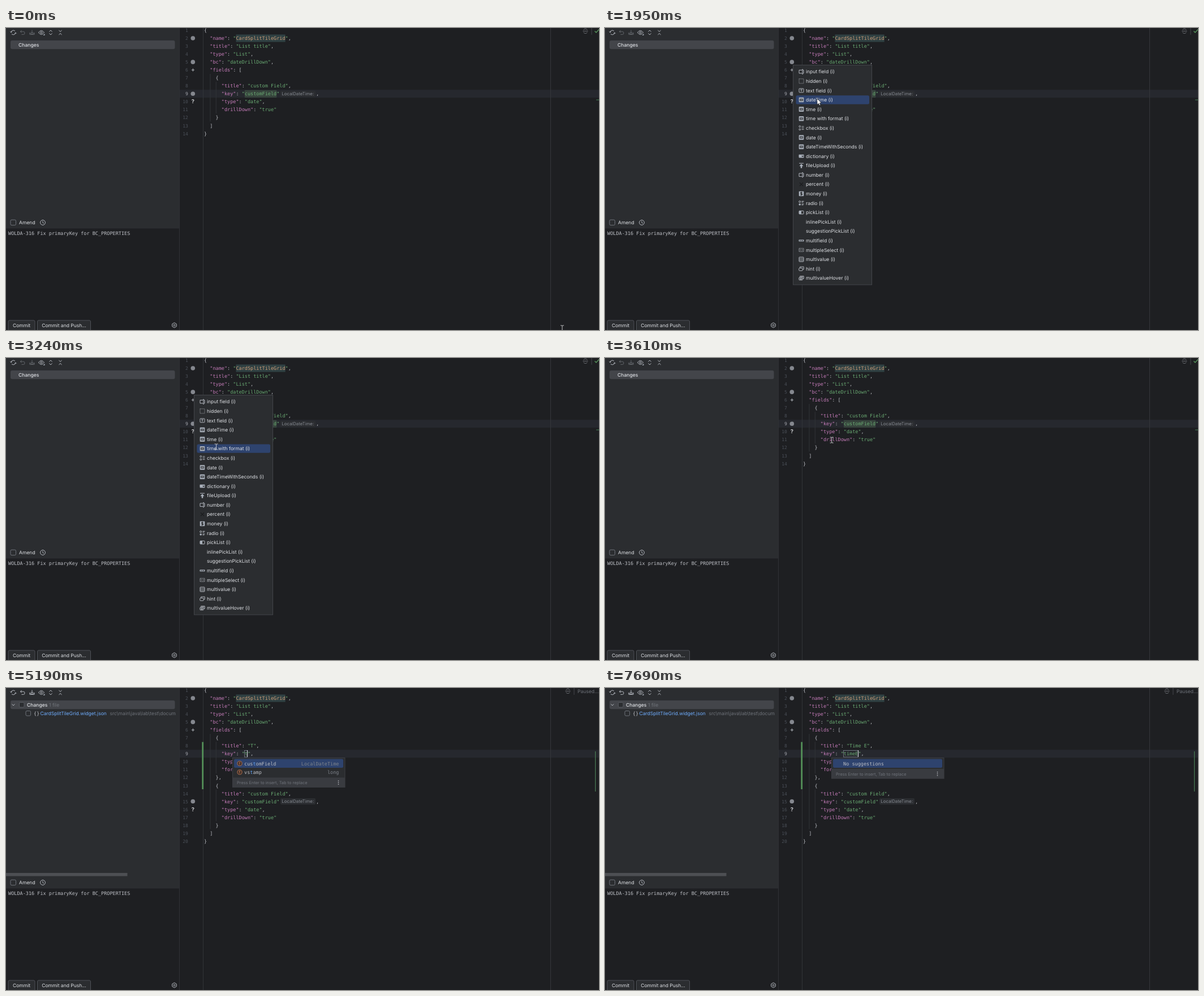
These frames come from a looping animation (1048 px wide and 534 px high, 8 s). An HTML page:

```html
<!DOCTYPE html>
<html lang="en">
<head>
<meta charset="utf-8">
<title>Editor</title>
<style>
html, body { margin: 0; width: 100%; height: 100%; overflow: hidden; background: #1e1f22; }
svg { display: block; width: 1048px; height: 534px; }
text { font: 8.55px Inter, sans-serif; fill: #dfe1e5; white-space: pre; text-rendering: geometricPrecision; }
.mono { font: 8.52px "DejaVu Sans Mono", monospace; fill: #bcbec4; }
.num { font-size: 8px; fill: #4b5059; text-anchor: end; }
.current { fill: #a1a3ab; }
.end { text-anchor: end; }
.mid { text-anchor: middle; }
.strong { font-weight: 500; }
.key { fill: #c77dbb; }
.str { fill: #6aab73; }
.ref { fill: #cf9d78; }
.hit { fill: #62a3f2; }
.link { fill: #70aeff; }
.grey { fill: #6f737a; }
.type { fill: #7f848c; }
.small { font-size: 7.4px; }
.hint { font-size: 7.8px; fill: #868a91; }
.help { font-size: 9.5px; font-weight: 600; }
.badge { font-size: 6.5px; fill: #e08855; }
.line { fill: none; stroke: #b4b8bf; stroke-width: 1; }
.off { opacity: .38; }
.solid { fill: #a9b0ba; }
.mouse { fill: #fff; stroke: #111; stroke-width: .6; }
</style>
</head>
<body>
<svg viewBox="0 0 1048 534">
  <g id="side"></g>
  <g id="editor"></g>
  <g id="folds"></g>
  <g id="typing"></g>
  <g id="menu"></g>
  <g id="cursor"></g>
</svg>
<script>
const LOOP = 8000, CHAR = 5.13, CODE_X = 350, ROW = 16.59, MENU_Y = 77.3;
const INSERTED = 3640, SUGGESTED = 3860, LISTED = 4130;
const NAME = 'CardSplitTileGrid';
const $ = id => document.getElementById(id);

const lineY = n => 4 + 14.035 * (n - 1);
const col = n => CODE_X + n * CHAR;
const text = (x, y, s, cls = '') => `<text x="${x}" y="${y + 3.1}" class="${cls}">${s}</text>`;
const rect = (x, y, w, h, fill, more = '') =>
  `<rect x="${x}" y="${y}" width="${w}" height="${h}" fill="${fill}" ${more}/>`;
const path = (d, more = 'class="line"') => `<path d="${d}" ${more}/>`;
const at = (x, y, body, more = '') => `<g transform="translate(${x} ${y})" ${more}>${body}</g>`;
const outline = color => `stroke="${color}" rx="2"`;

// Left panel

function toolbar(active) {
  const dim = active ? '' : 'class="off"';
  const chevrons = (a, b) => path(`M-2.6 ${a}L0 ${b}L2.6 ${a}M-2.6 ${-a}L0 ${-b}L2.6 ${-a}`);
  return at(13, 8, path('M-4-.5A4 4 0 0 1 3-2.5M4 .5A4 4 0 0 1-3 2.5M-5.5-1.8L-4 0L-2.3-1.6M5.5 1.8L4 0L2.3 1.6'))
    + at(29.5, 8, path('M-1.8-4L-4-1.7L-1.8 .5M-4-1.7H1A2.6 2.6 0 0 1 1 3.5H-2'), dim)
    + at(46, 8, path('M0-4.5V1M-2.2-1L0 1.2L2.2-1M-4 0V3.5H4V0M-4 1.5H-2L-1 2.8H1L2 1.5H4'), dim)
    + at(62.5, 8, path('M-5 0Q0-7 5 0Q0 7-5 0Z') + '<circle r="1.6" class="line"/>'
      + path('M6 2V5H3Z', 'class="solid"'))
    + at(79, 8, chevrons(-1.5, -4))
    + at(96, 8, chevrons(-4, -1.5));
}

function tree(listed) {
  const row = rect(8, 22, 290.5, 15.3, '#43454a', 'rx="3"');
  if (!listed) return row + text(22, 29.6, 'Changes', 'strong');
  return row + path('M10.5 28.5L13 31L15.5 28.5')
    + rect(23.5, 25.5, 8.6, 8.6, '#2b2d30', outline('#5a5d63'))
    + text(37, 29.6, 'Changes', 'strong') + text(76, 29.6, '1 file', 'grey')
    + rect(35, 40.5, 8.6, 8.6, '#2b2d30', outline('#6f737a'))
    + text(49, 44.6, '{}', 'mono')
    + text(60.5, 44.6, `${NAME}.widget.json`, 'link')
    + text(183.5, 44.6, 'src\\main\\java\\lab\\test\\docum', 'grey')
    + rect(306, 38, 60, 14, '#1e1f22')
    + rect(0, 327, 214.5, 5.6, '#4d4f53');
}

function gear() {
  const corners = Array.from({ length: 6 }, (_, i) => {
    const a = (i + .5) * Math.PI / 3;
    return `${4.4 * Math.cos(a)} ${4.4 * Math.sin(a)}`;
  });
  return path(`M${corners.join('L')}Z`) + '<circle r="1.5" class="line"/>';
}

const side = listed => rect(0, 0, 306, 354.5, '#2b2d30')
  + toolbar(listed) + tree(listed)
  + rect(8, 339.2, 9.5, 9.5, '#2b2d30', outline('#6f737a'))
  + text(23, 344, 'Amend')
  + at(65, 344, '<circle r="4.4" class="line"/>' + path('M0-2.6V.3L2 1.5'))
  + text(4, 362.7, 'WOLDA-316 Fix primaryKey for BC_PROPERTIES', 'mono')
  + rect(4, 517, 47, 20, '#2b2d30', outline('#4e5157'))
  + rect(55.5, 517, 94, 20, '#2b2d30', outline('#4e5157'))
  + text(27.5, 526, 'Commit', 'mid') + text(102.5, 526, 'Commit and Push...', 'mid')
  + at(297.5, 525.5, gear())
  + rect(306, 0, 1, 534, '#2f3135');

// Editor

const head = ['{', `  "name": "${NAME}",`, '  "title": "List title",', '  "type": "List",',
  '  "bc": "dateDrillDown",', '  "fields": [', '    {'];
const field = ['      "title": "custom Field",', '      "key": "customField"', '      "type": "date",',
  '      "drillDown": "true"', '    }', '  ]', '}'];
const added = ['', '', '      "type": "time",', '      "format": "HH:mm"', '    },', '    {'];

const span = (cls, s) => `<tspan class="${cls}">${s}</tspan>`;
const paint = s => s.replace(/"([^"]*)"(:?)/g, (_, word, colon) => {
  if (word === NAME) return span('str', '"') + span('ref', word) + span('str', '"');
  return span(colon ? 'key' : 'str', `"${word}"`) + colon;
});

function codeLine(s, n) {
  const trimmed = s.trimStart();
  return text(col(s.length - trimmed.length), lineY(n), paint(trimmed), 'mono');
}

function editor(edited) {
  const lines = [...head, ...(edited ? added : []), ...field];
  const shift = edited ? added.length : 0;
  const keyLine = 9 + shift, keyY = lineY(keyLine);
  const guide = (c, from, to) => rect(col(c) + .2, lineY(from) - 7, 1, lineY(to) - lineY(from) + 14, '#313438');
  const number = n => text(321.8, lineY(n), n, n === 9 ? 'mono num current' : 'mono num');
  const status = edited ? 993 : 1024;

  return rect(307, 109.2, 741, 14, '#26282e')
    + rect(348, 0, 1, 534, '#313438') + rect(962, 0, 1, 534, '#35373b')
    + guide(2, 7, 12 + shift) + guide(4, 8, 11)
    + (edited ? guide(4, 14, 17) : '')
    + rect(col(11), 11.5, NAME.length * CHAR, 13.2, '#2f4042')
    + (edited ? '' : rect(col(14), 110, 11 * CHAR, 13, '#37453d'))
    + lines.map((s, i) => number(i + 1) + codeLine(s, i + 1)).join('')
    + [2, 5, keyLine].map(n => `<circle cx="330.3" cy="${lineY(n)}" r="3.8" fill="#85888f"/>`).join('')
    + path('M327.8 74.2H333M330.4 71.6V76.8')
    + text(330.3, lineY(keyLine + 1), '?', 'mid help')
    + rect(485, keyY - 5.6, 62, 11.2, '#2b2d31', 'rx="2"')
    + text(487.3, keyY - .3, 'LocalDateTime:', 'hint') + text(548, keyY, ',', 'mono')
    + at(status, 5.5, path('M-3.5-2A4 4 0 0 1 3.5-2M-3.5 2A4 4 0 0 0 3.5 2M-4.5 0H4.5'), 'opacity=".5"')
    + rect(status + 10.5, 0, 1, 12, '#43454a')
    + (edited
      ? text(1010, 5.5, 'Paused...', 'grey') + rect(346.3, 95.5, 2.8, 83.5, '#549159')
        + rect(1041, 112, 1.2, 71, '#4a7d55')
      : path('M1040.5 5.5L1043 8L1048 2.5', 'fill="none" stroke="#57965c" stroke-width="1.4"')
        + rect(1043, 126.5, 5, 1.2, '#3f7551'));
}

const folds = [1, 6, 7].map(n => at(340.3, lineY(n), path('M-2.5-1.2L0 1.3L2.5-1.2'), 'opacity=".65"')).join('');

// Typed field and its suggestions

const typed = [
  [INSERTED, ''], [5190, 'T'], [5750, 'Ti'], [6180, 'Tim'], [6560, 'Time'], [7690, 'Time E']
];
const caretOff = [[4870, 5190], [7310, 7690]];
const fields = [['customField', 'LocalDateTime'], ['id', 'String'], ['vstamp', 'long']];

function suggestions(key) {
  const found = fields.filter(([name]) => name.includes(key));
  const rows = Math.max(found.length, 1), foot = 127.6 + 15.4 * rows;
  const mark = name => key ? name.replace(key, span('hit', key)) : name;
  return rect(400.5, 123.5, 198.5, foot - 106.5, '#2b2d30', 'stroke="#3c3e43"')
    + rect(403, 125.6, 193, 15.4, '#2e436e', 'rx="2.5"')
    + found.map(([name, type], i) => {
      const y = 133.4 + 15.4 * i;
      return `<circle cx="413" cy="${y}" r="4.1" fill="#45322b" stroke="#c77d55" stroke-width=".8"/>`
        + text(413, y - .8, 'f', 'mid badge')
        + text(421, y, mark(name), 'mono') + text(588.5, y, type, 'mono end type');
    }).join('')
    + (found.length ? '' : text(421, 133.4, 'No suggestions', 'mono'))
    + rect(401, foot, 198, 17, '#393b40')
    + text(408, foot + 8.6, 'Press Enter to insert, Tab to replace', 'small grey')
    + [-3, 0, 3].map(d => `<circle cx="587.5" cy="${foot + 8.8 + d}" r=".8" fill="#ced0d6"/>`).join('');
}

function typing(title, caret, open) {
  const key = title.charAt(0).toLowerCase() + title.slice(1).replace(' ', '');
  const w = key.length * CHAR;
  const frame = key
    ? rect(421.5, 110.5, w, 11.5, 'none', 'stroke="#7d858c" stroke-width=".8"')
    : rect(420.6, 110, 2.6, 12, '#3f7bd6');
  return codeLine(`      "title": "${title}",`, 8) + codeLine(`      "key": "${key}",`, 9)
    + frame + (caret ? rect(Math.floor(421.5 + w), 110, 1.1, 12, '#ced0d6') : '')
    + (open ? suggestions(key) : '');
}

// Field menu

const box = (x, y, w, h, cls = 'line') => `<rect x="${x}" y="${y}" width="${w}" height="${h}" class="${cls}" rx=".8"/>`;
const cut = d => path(d, 'fill="none" stroke="#2b2d30" stroke-width="1.2"');
const windows = path('M-2.3-1V-3.5H4.2V1H2.2') + box(-4.2, -1.2, 6.4, 4.6);
const icons = {
  input: path('M1-2.8H-4V2.8H1M3-2.8H4V2.8H3M2-4V4M1-4H3M1 4H3'),
  hidden: '<rect x="-4" y="-4" width="8" height="8" class="line" stroke-dasharray="1.2 1" opacity=".8"/>',
  text: box(-4, -3.4, 8, 6.8) + path('M-1.8-1.4H1.8M0-1.4V2'),
  date: box(-4.3, -4.3, 8.6, 8.6, 'solid') + rect(-2.9, -2, 5.8, 4, '#3a3d42') + path('M-1.9 0H1.9'),
  check: box(-4, -4, 2.6, 2.6) + box(-4, 1.2, 2.6, 2.6) + path('M.5-2.7H4.5M.5 0H4.5M.5 2.6H4.5'),
  dict: box(-4.5, -2.8, 9, 5.6, 'solid') + cut('M.8-.6L2.2 .8L3.6-.6'),
  upload: path('M-4-4H4') + path('M0-3L3.6 1H1.2V4.6H-1.2V1H-3.6Z', 'class="solid"'),
  percent: path('M-3-3L3 3M3-3L-3 3', 'stroke="#1b1c1e" stroke-width="1.4"'),
  money: box(-4.3, -4.3, 8.6, 8.6, 'solid') + cut('M1.8-1.8Q0-3-1.5-1.6Q-1.5 0 0 0Q1.8 .2 1.5 1.6Q0 3-1.8 1.8M0-3.4V3.4'),
  radio: '<circle cx="-2.8" cy="-2.4" r="1.5" class="line"/><circle cx="-2.8" cy="2.4" r="1.8" class="solid"/>'
    + path('M.5-3.2H4.5M.5-1.4H3.5M.5 1.6H4.5M.5 3.4H3.5'),
  pick: box(-4, -2.8, 8, 5.6) + box(-4, -2.8, 4, 5.6, 'solid'),
  none: '',
  pill: box(-4.5, -1.6, 9, 3.2, 'solid') + cut('M-3 0H-1M0 0H3'),
  multi: '<rect x="-4" y="-2.8" width="8" height="5.6" class="line" stroke-dasharray="1.6 .8"/>' + path('M-2.5 0H-.7M.7 0H2.5'),
  table: box(-4, -4, 8, 8) + path('M-4-1.8H4M-4 .2H4M-4 2.2H4', 'class="line" opacity=".7"'),
  hint: windows,
  hover: windows + path('M-3 .6H1M-3 2H1M-1-2.3H3')
};
const items = ['input field:input', 'hidden:hidden', 'text field:text', 'dateTime:date', 'time:date',
  'time with format:date', 'checkbox:check', 'date:date', 'dateTimeWithSeconds:date', 'dictionary:dict',
  'fileUpload:upload', 'number:input', 'percent:percent', 'money:money', 'radio:radio', 'pickList:pick',
  'inlinePickList:none', 'suggestionPickList:none', 'multifield:pill', 'multipleSelect:multi',
  'multivalue:table', 'hint:hint', 'multivalueHover:hover'];

const menu = picked => rect(332.5, 65.5, 139, 388.5, '#2b2d30', 'stroke="#43454a"')
  + (picked < 0 ? '' : rect(337.5, MENU_Y - 7.8 + picked * ROW, 129.5, 15.4, '#2e436e', 'rx="2.5"'))
  + items.map((item, i) => {
    const [label, icon] = item.split(':'), y = MENU_Y + i * ROW;
    return at(347, y, icons[icon]) + text(355, y, `${label} (i)`);
  }).join('');

// Mouse pointer

const pointers = {
  beam: path('M-3-5H-1.2Q0-5 0-4Q0-5 1.2-5H3M0-4V4M-3 5H-1.2Q0 5 0 4Q0 5 1.2 5H3', 'fill="none" stroke="#d5d6d9" stroke-width=".9"'),
  arrow: path('M0 0V10.6L2.4 8.4L4 12L5.8 11.2L4.3 7.7H7.6Z', 'class="mouse"'),
  hand: path('M-1 .5Q0-.8 1 .5V4L5.5 5V8.5L4.3 12H-.8L-3.8 7.4Q-3 6-1 7.4Z', 'class="mouse"')
};
const route = [
  [0, 983, 531], [60, 983, 531], [700, 327, 73], [830, 333, 70], [1400, 333, 70], [1960, 375, 125],
  [2160, 375, 126.5], [2210, 375, 126.5], [2500, 374, 188], [2860, 371.6, 157], [3400, 371.6, 157],
  [4000, 474, 115], [4240, 476.7, 113], [LOOP, 476.7, 113]
];

function pointerAt(t) {
  const i = route.findIndex(([end]) => end > t);
  const [a, x0, y0] = route[i - 1], [b, x1, y1] = route[i];
  const u = (t - a) / (b - a), k = u * u * (3 - 2 * u);
  return [x0 + (x1 - x0) * k, y0 + (y1 - y0) * k];
}

function pointerShape(t, x) {
  if (t >= 3240) return 'beam';
  if (t >= 1100) return 'arrow';
  return x < 338 ? 'hand' : x < 349 ? 'arrow' : 'beam';
}

// Redraws a layer only when its state differs
const drawn = {};
function layer(id, state, draw) {
  const stamp = String(state);
  if (drawn[id] === stamp) return;
  drawn[id] = stamp;
  $(id).innerHTML = draw(...state);
}
const show = (id, on) => { $(id).style.display = on ? '' : 'none'; };

function render() {
  const t = performance.now() % LOOP;
  const [x, y] = pointerAt(t);
  const edited = t >= INSERTED;

  layer('side', [t >= LISTED], side);
  layer('editor', [edited], editor);
  show('folds', x < 349 && t < 1400);

  show('typing', edited);
  if (edited) {
    const title = typed.filter(([from]) => t >= from).pop()[1];
    const caret = !caretOff.some(([a, b]) => t >= a && t < b);
    layer('typing', [title, caret, t >= SUGGESTED], typing);
  }

  const open = t >= 1030 && t < 3310;
  show('menu', open);
  if (open) {
    layer('menu', [x < 337 ? -1 : Math.floor((y - MENU_Y + ROW / 2) / ROW)], menu);
    $('menu').style.opacity = Math.min(1, .25 + (t - 1030) / 200);
  }

  show('cursor', t < 5190);
  layer('cursor', [pointerShape(t, x)], shape => pointers[shape]);
  $('cursor').setAttribute('transform', `translate(${x} ${y})`);
  requestAnimationFrame(render);
}

$('folds').innerHTML = folds;
render();
</script>
</body>
</html>
```
